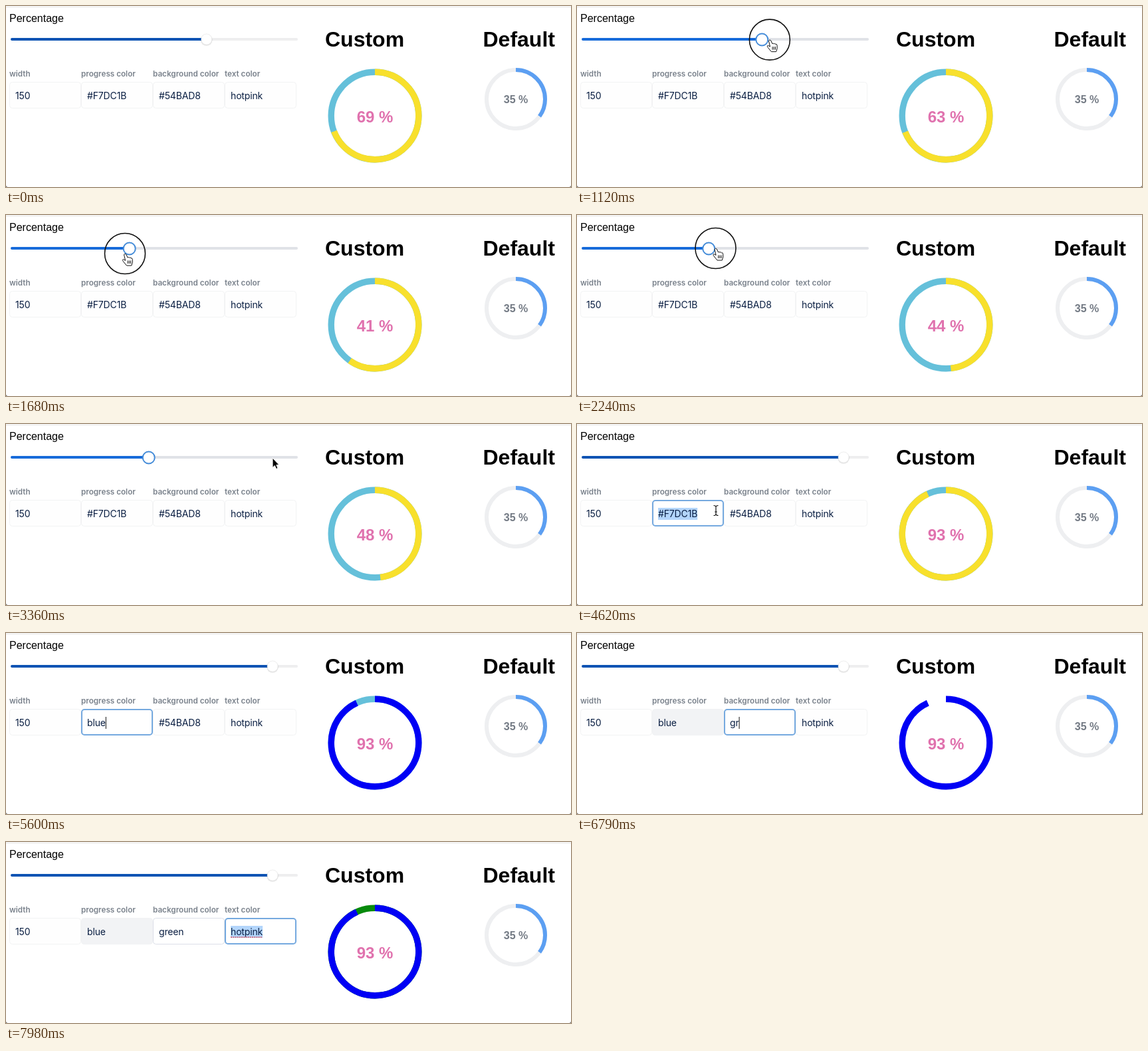
An HTML page that plays this animation: 850x272 px, repeating every 8000 ms.

```html
<!DOCTYPE html>
<html lang="en">
<head>
<meta charset="utf-8">
<title>Progress ring demo</title>
<style>
html, body { margin: 0; width: 100%; height: 100%; overflow: hidden; background: #fff; }
svg { display: block; width: 850px; height: 272px; font-family: "Liberation Sans", Arial, sans-serif; }
.label { font: 600 11.7px Inter, sans-serif; fill: #7a828c; }
.value { font: 14px Inter, sans-serif; letter-spacing: -.15px; fill: #091e42; }
.title { font-size: 32px; font-weight: bold; }
.pct { font-weight: bold; text-anchor: middle; }
.ring { fill: none; }
</style>
</head>
<body>
<svg id="stage" viewBox="0 0 850 272">
  <path d="M0 1.5H850" stroke="#e6e6e6"/>
  <path d="M0 269V272H3Q0 272 0 269M850 269V272H847Q850 272 850 269" fill="#555"/>
  <text x="5" y="24" font-size="16">Percentage</text>
  <g stroke-width="4" stroke-linecap="round">
    <path id="track" d="M9 50H437"/>
    <path id="fill"/>
  </g>
  <circle id="halo" cy="50.8" r="9" fill="#000" opacity=".1"/>
  <circle id="thumb" cy="50" fill="#fff"/>
  <g id="fields"></g>
  <text class="title" x="480" y="61">Custom</text>
  <text class="title" x="717.5" y="61">Default</text>
  <g id="custom"></g>
  <g id="default"></g>
  <g id="cursor">
    <circle id="press" r="30.5" fill="none" stroke="#111" stroke-width="1.6"/>
    <path id="arrow" d="M0 0V14.5L3.3 11.5L5.6 16.5L8 15.4L5.8 10.6H10Z" stroke="#fff"/>
    <path id="hand" d="M-1.5 1.5Q0-.8 1.8 1.2L4 6Q5.5 4.8 6.5 6.2Q8 5 9 6.8Q10.8 6.2 11.2 8.5L11.3 13L9.8 18H2.5L-2.6 11.8Q-4.6 8.8-2.4 8.6L.6 10.4ZM4.2 10.5V15M6.4 10.5V15M8.6 10.5V15" fill="#fff" stroke="#111" stroke-linejoin="round"/>
    <path id="beam" d="M-3.5-7.5Q0-7.5 0-5Q0-7.5 3.5-7.5M0-5V5M-3.5 7.5Q0 7.5 0 5Q0 7.5 3.5 7.5M-1.8 2H1.8" fill="none" stroke="#111" stroke-width="1.2"/>
  </g>
</svg>
<script>
const LOOP = 8000;
const $ = id => document.getElementById(id);
const set = (el, attrs) => { for (const k in attrs) el.setAttribute(k, attrs[k]); };
const show = (el, on) => set(el, { visibility: on ? 'visible' : 'hidden' });
const within = (t, a, b) => t >= a && t < b;

function add(parent, tag, attrs, text = '') {
  const el = document.createElementNS('http://www.w3.org/2000/svg', tag);
  set(el, attrs);
  el.textContent = text;
  parent.append(el);
  return el;
}

// Value of column col at time t, from rows [time, ...values]
function track(rows, t, col = 1, ease = u => u) {
  const i = rows.findIndex(row => row[0] > t);
  if (i < 0) return rows[rows.length - 1][col];
  if (!i) return rows[0][col];
  const a = rows[i - 1], b = rows[i];
  return a[col] + (b[col] - a[col]) * ease((t - a[0]) / (b[0] - a[0]));
}
const smooth = u => u * u * (3 - 2 * u);

const percent = [[1000, 69], [1300, 55], [1680, 41], [1800, 40], [2240, 44], [2560, 48], [3430, 48], [3431, 93]];
const sweep = [[1100, 69.2], [1400, 66.5], [1680, 59.8], [1950, 52], [2240, 48.2], [2500, 47], [2900, 48],
  [3480, 48], [3620, 55], [3800, 74], [3950, 86], [4200, 93.2]];
const pointer = [[250, 330, 262], [850, 300, 50], [1000, 300, 50], [1680, 179, 58], [1780, 176, 58],
  [2240, 208.5, 50], [2520, 217, 50], [2700, 217, 50], [3300, 401, 51], [4270, 402, 52],
  [4440, 119, 144], [4570, 205, 134], [4620, 209, 130]];

// Focus span, first key time and typed word of each field
const fields = [
  { label: 'width', value: '150' },
  { label: 'progress color', value: '#F7DC1B', paint: '#f8e02c', focus: 4440, blur: 6100, type: 5150, step: 100, word: 'blue' },
  { label: 'background color', value: '#54BAD8', paint: '#65c0da', focus: 6100, blur: 7940, type: 6650, step: 110, word: 'green' },
  { label: 'text color', value: 'hotpink', focus: 7940, blur: LOOP, type: Infinity }
];
fields.forEach((f, i) => {
  const x = 5 + i * 108, g = $('fields');
  f.x = x + 9;
  add(g, 'text', { class: 'label', x, y: 106 }, f.label);
  f.box = add(g, 'rect', { rx: 4 });
  f.mark = add(g, 'rect', { x: f.x, y: 126, height: 18, fill: '#b3d5fb' });
  f.text = add(g, 'text', { class: 'value', x: f.x, y: 140 });
  f.caret = add(g, 'rect', { y: 126, width: 1, height: 18, fill: '#111' });
  f.wavy = add(g, 'path', { stroke: '#e0525a', 'stroke-width': 1.6, 'stroke-dasharray': '2 1.2' });
});

function makeRing(id, cx, cy, r, width, size, color) {
  const g = $(id), base = { class: 'ring', cx, cy, r, 'stroke-width': width };
  return {
    back: add(g, 'circle', base),
    bar: add(g, 'circle', { ...base, pathLength: 100, transform: `rotate(-90 ${cx} ${cy})` }),
    text: add(g, 'text', { class: 'pct', x: cx, y: cy + size * .4, 'font-size': size, fill: color })
  };
}
function drawRing(ring, part, value, front, back) {
  set(ring.back, { stroke: back });
  set(ring.bar, { stroke: front, 'stroke-dasharray': `${part} 100` });
  ring.text.textContent = value + ' %';
}
const custom = makeRing('custom', 555, 165, 65.8, 9.4, 24, '#e072ae');
drawRing(makeRing('default', 767, 140, 44, 6, 16, '#737a84'), 35, 35, '#5c9ff2', '#eeeff1');

function drawField(f, i, t) {
  const focused = within(t, f.focus, f.blur);
  const typed = t >= f.type ? Math.min(f.word.length, 1 + Math.floor((t - f.type) / f.step)) : 0;
  const selected = focused && !typed && (i !== 1 || t > 4540);
  const hovered = i === 1 && t >= f.blur;
  const fading = i === 2 && t >= f.blur;
  const edge = focused ? 2 : 1;
  set(f.box, {
    x: f.x - 9 + edge / 2, y: 114 + edge / 2, width: 108 - edge, height: 40 - edge, 'stroke-width': edge,
    stroke: focused ? '#75a9df' : fading ? '#dcdfe8' : hovered ? '#f1f2f4' : '#f2f3f4',
    fill: hovered ? '#f2f3f5' : focused || fading ? '#fff' : '#fefefe'
  });
  f.text.textContent = typed ? f.word.slice(0, typed) : f.value;
  const w = f.text.getComputedTextLength();
  set(f.mark, { width: w });
  show(f.mark, selected);
  set(f.caret, { x: f.x + w });
  show(f.caret, focused && typed);
  set(f.wavy, { d: `M${f.x} 143H${f.x + w}` });
  show(f.wavy, i === 3 && selected);
  // An unfinished colour name paints nothing
  f.color = !typed ? f.paint : typed < f.word.length ? 'none' : f.word === 'blue' ? '#0000f5' : '#078a0c';
}

function draw(t) {
  const value = track(percent, t), x = 16 + value * 4.14;
  const hover = within(t, 830, 4290), active = within(t, 950, 4440);
  set($('track'), { stroke: hover ? '#e0e2e7' : '#eeeeef' });
  set($('fill'), { d: `M9 50H${x}`, stroke: hover ? '#176bda' : '#0b53b3' });
  set($('halo'), { cx: x });
  set($('thumb'), { cx: x, cy: active ? 50.5 : 50, r: active ? 9 : 8, stroke: active ? '#438bd8' : '#e8e8e8', 'stroke-width': active ? 2 : .6 });

  fields.forEach((f, i) => drawField(f, i, t));
  drawRing(custom, track(sweep, t), Math.round(value), fields[1].color, fields[2].color);

  const visible = within(t, 250, 5120);
  const beam = t >= 4410;
  const hand = within(t, 850, 2650) || within(t, 3430, 4270);
  const pressed = within(t, 950, 2600) || within(t, 3430, 4270) || within(t, 4440, 4570);
  set($('cursor'), { transform: `translate(${track(pointer, t, 1, smooth)} ${track(pointer, t, 2, smooth)})` });
  show($('press'), visible && pressed);
  show($('hand'), visible && hand);
  show($('beam'), visible && beam);
  show($('arrow'), visible && !hand && !beam);
}

const start = performance.now();
function frame() {
  draw((performance.now() - start) % LOOP);
  requestAnimationFrame(frame);
}
frame();
</script>
</body>
</html>
```
